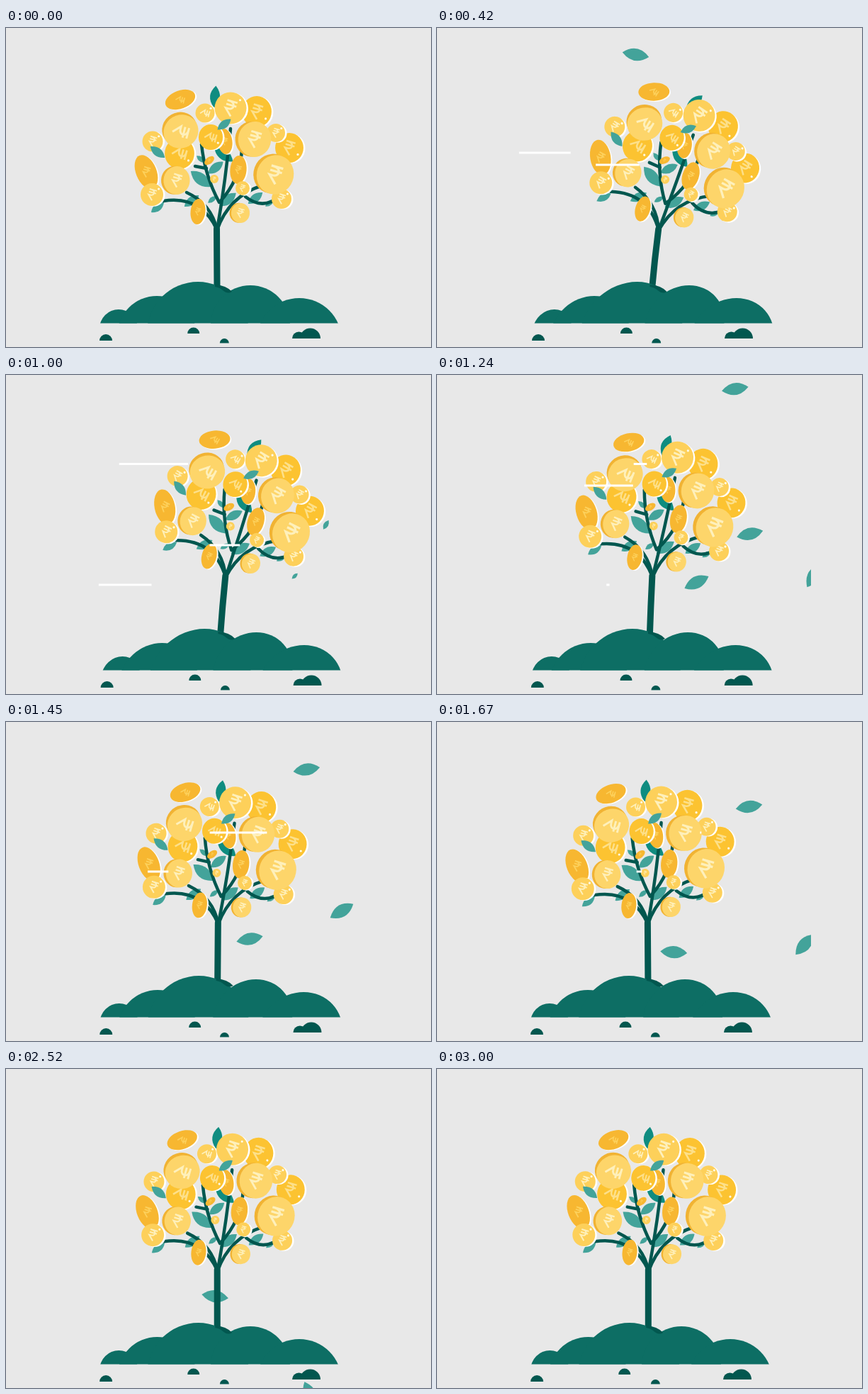
Recreate the animation shown at these times as an HTML page with a canvas. Size 600 px wide and 450 px high, loop 3030 ms.

```html
<!DOCTYPE html>
<html lang="en">
<head>
<meta charset="utf-8">
<title>Money tree</title>
<style>
html, body { margin: 0; width: 100%; height: 100%; overflow: hidden; background: #e8e8e8; }
canvas { display: block; }
</style>
</head>
<body>
<canvas id="stage" width="600" height="450"></canvas>
<script>
const ctx = document.getElementById('stage').getContext('2d');
const LOOP = 3030, STEP = 30, RAD = Math.PI / 180;
const DARK = '#02574f', HILL = '#0d6e64', LEAF = '#43a39a', DEEP = '#0f8c80';
const GROUND = 416.5, FOOT = { x: 298, y: 362 };

// Time keys: [ms, amount]
const SWAY = [[0, 0], [520, 1.1], [640, 1.1], [1670, -.01], [2300, .045], [LOOP, .055]];
const WAVE = [[0, 0], [400, 1], [730, .65], [1180, .85], [2200, 0], [LOOP, 0]];

// Branches: from, to, bow
const BRANCHES = [
  [298, 285, 222, 244, .38], [298, 285, 255, 232, .25], [298, 285, 317, 142, .02],
  [301, 246, 276, 164, -.1], [283, 198, 267, 195, 0], [302, 245, 333, 172, .18],
  [298, 285, 362, 222, -.25], [338, 238, 386, 238, .4]
];

// Leaves: x, y, length; a negative length points up
const LEAVES = [
  [214, 253, -23], [262, 244, -26], [275, 213, 36], [296, 197, -27], [313, 242, -30],
  [291, 242, -15], [352, 240, -26], [372, 247, -15], [275, 185, 15]
];
const FRONT_LEAVES = [[308, 136, -24], [214, 175, 26]];

// Coins by kind: x, y, radius, tilt
const KINDS = [
  { face: '#f7b731', mark: '#fdd15c', squash: .58, edge: 2,
    coins: [[246, 101, 22, 70], [309, 160, 18, -8], [328, 200, 20, 5],
            [287, 187, 8, 52], [271, 259, 18, 6], [198, 203, 25, -22]] },
  { face: '#fcc331', mark: '#fde08a', squash: .95, edge: 2.5, glint: .45,
    coins: [[354, 118, 22], [400, 169, 21], [245, 177, 22], [289, 154, 18]] },
  { face: '#fdd05a', mark: '#fef0bb', squash: 1, edge: 2.5, glint: -.5,
    coins: [[281, 120, 13.5], [317, 113, 22.5], [381, 148, 13], [207, 160, 14.5],
            [206, 235, 16], [389, 241, 14], [334, 226, 10], [294, 213, 6]] },
  { face: '#fdd56a', mark: '#fef0bb', squash: .93, rim: '#f1b333',
    coins: [[247, 146, 25, 60], [351, 157, 25, 5], [241, 215, 20, 3],
            [331, 261, 14, 5], [380, 207, 28, 20]] }
];

const HUMPS = [[159, 424, 27], [213, 434, 56], [271, 430, 72], [345, 419, 56], [414, 441, 60]];

// Gusts: y, left end, start, duration
const GUSTS = [
  [176, 114, 198, 475], [193, 224, 222, 475], [240, 164, 486, 475], [125.5, 130, 668, 475],
  [156, 207, 1017, 475], [296, 114, 755, 370], [211, 200, 1341, 255]
];

// Loose leaves: start, x, y, speed x, speed y (per second), angle, spin
const WIND = 144, FALL = 60;
const LOOSE = [
  [320, 135, 28, 1440, 90, 10, 0], [1100, 425, -7, -51, 197, -9, 0],
  [1000, 421, 184, 57, 161, 6, -84], [960, 414, 283, -215, 19, -46, 72],
  [950, 440, 200, 288, 279, -60, 0], [2300, 302, 176, -63, 644, 8, 0]
];

const smooth = u => (1 - Math.cos(Math.PI * Math.max(0, Math.min(1, u)))) / 2;
const mix = (a, b, u) => a + (b - a) * u;

function at(keys, t) {
  const i = keys.findIndex(k => t < k[0]);
  const [t0, a] = keys[i - 1], [t1, b] = keys[i];
  return mix(a, b, smooth((t - t0) / (t1 - t0)));
}

// Bends the tree about its foot, more strongly with height
function bend(x, y, s) {
  const h = FOOT.y - y, up = Math.max(0, h), off = x - FOOT.x;
  const mean = (4.6 + .026 * up) * s * RAD;
  const turn = (4.6 + .052 * up) * s * RAD;
  return {
    x: FOOT.x + 6 * s + h * Math.sin(mean) + off * Math.cos(turn),
    y: FOOT.y - h * Math.cos(mean) + off * Math.sin(turn),
    turn
  };
}

// Runs paint in a moved and turned frame
function placed(x, y, turn, paint) {
  ctx.save();
  ctx.translate(x, y);
  ctx.rotate(turn);
  paint();
  ctx.restore();
}

function oval(x, y, rx, ry, color) {
  ctx.fillStyle = color;
  ctx.beginPath();
  ctx.ellipse(x, y, rx, ry, 0, 0, 2 * Math.PI);
  ctx.fill();
}

function leaf(length, color = LEAF) {
  const a = length / 2, w = length * .45;
  ctx.fillStyle = color;
  ctx.beginPath();
  ctx.moveTo(-a, 0);
  ctx.quadraticCurveTo(0, -w, a, 0);
  ctx.quadraticCurveTo(0, w, -a, 0);
  ctx.fill();
}

function treeLeaf([x, y, length], s, color) {
  const p = bend(x, y, s);
  const slant = Math.sign(length) * 38 * RAD;
  placed(p.x, p.y, p.turn + slant, () => leaf(Math.abs(length), color));
}

function rupee(size, color) {
  ctx.scale(size, size);
  ctx.strokeStyle = color;
  ctx.lineWidth = .19;
  ctx.beginPath();
  ctx.moveTo(-.5, -.65); ctx.lineTo(.5, -.65);
  ctx.moveTo(-.5, -.28); ctx.lineTo(.5, -.28);
  ctx.moveTo(-.35, -.65);
  ctx.bezierCurveTo(.4, -.65, .4, .1, -.2, .1);
  ctx.lineTo(-.45, .1);
  ctx.lineTo(.22, .75);
  ctx.stroke();
}

function coin(kind, [x, y, r, tilt = 0], s) {
  const p = bend(x, y, s), rx = r * kind.squash;
  placed(p.x, p.y, p.turn, () => {
    if (kind.edge && r > 8) {
      placed(kind.edge, .8, tilt * RAD, () => oval(0, 0, rx, r, '#fff'));
    }
    placed(0, 0, tilt * RAD, () => {
      if (kind.rim) oval(-r * .17, 0, rx, r, kind.rim);
      oval(0, 0, rx, r, kind.face);
    });
    // Coins of the upper left cluster lie on their side
    const lying = Math.hypot(x - 262, y - 140) < 45;
    if (r > 5) {
      placed(0, 0, (lying ? 105 : 16) * RAD, () => rupee(Math.min(rx, r) * .66, kind.mark));
    }
    if (kind.glint && r > 12) oval(rx * .6, r * kind.glint, 1.6, 1.6, '#fffbe6');
  });
}

function branch([x0, y0, x1, y1, bow], s, width = 4.5) {
  const a = bend(x0, y0, s), b = bend(x1, y1, s);
  const c = bend((x0 + x1) / 2 - (y1 - y0) * bow, (y0 + y1) / 2 + (x1 - x0) * bow, s);
  ctx.lineWidth = width;
  ctx.beginPath();
  ctx.moveTo(a.x, a.y);
  ctx.quadraticCurveTo(c.x, c.y, b.x, b.y);
  ctx.stroke();
}

function tree(s) {
  LEAVES.forEach(l => treeLeaf(l, s));
  treeLeaf([307, 178, 34], s, DEEP);
  const top = bend(295, 97, s);
  placed(top.x + 9 * s, top.y + 4 * s, top.turn + (25 * s - 85) * RAD, () => leaf(31, DEEP));

  ctx.strokeStyle = DARK;
  ctx.lineCap = 'round';
  branch([298, 370, 297.5, 283, 0], s, 9);
  BRANCHES.forEach(b => branch(b, s));
  ctx.lineCap = 'butt';

  KINDS.forEach(kind => kind.coins.forEach(c => coin(kind, c, s)));
  FRONT_LEAVES.forEach(l => treeLeaf(l, s));
}

function hill(s, v) {
  ctx.save();
  ctx.beginPath();
  ctx.rect(0, 0, 600, GROUND);
  ctx.clip();
  HUMPS.forEach(([x, y, r], i) => {
    const k = i < 3 ? Math.min(s, 1) : v;
    ctx.save();
    ctx.transform(1, 0, -.12 * k, 1, (4.5 + .12 * GROUND) * k, 0);
    oval(x, y, r, r, HILL);
    ctx.restore();
  });
  ctx.restore();

  // Trunk shadow
  placed(5.5 * mix(s, v, .3), 0, 0, () => {
    ctx.fillStyle = DARK;
    ctx.beginPath();
    ctx.moveTo(295, 362);
    ctx.quadraticCurveTo(311, 363, 319, 372);
    ctx.quadraticCurveTo(313, 376, 306, 370);
    ctx.quadraticCurveTo(302, 366, 295, 365);
    ctx.fill();
  });
}

function rock(x, y, r) {
  ctx.fillStyle = DARK;
  ctx.beginPath();
  ctx.arc(x, y, r, Math.PI, 2 * Math.PI);
  ctx.fill();
}

function rocks(s, v) {
  rock(141 + 2 * s, 441, 9);
  rock(264.7 + 2.7 * v, 431, 8.5);
  rock(308.3 + 1.4 * s, 444.5, 6.5);
  rock(413.5 + 2 * v, 438, 9.5);
  rock(429.5 + 2 * v, 438, 14.5);
}

function looseLeaves(t) {
  ctx.save();
  ctx.beginPath();
  ctx.rect(0, 0, 528, 450);
  ctx.clip();
  for (const [start, x, y, vx, vy, angle, spin] of LOOSE) {
    const u = (t - start) / 1000;
    if (u <= 0) continue;
    placed(x + vx * u + WIND * u * u, y + vy * u + FALL * u * u, (angle + spin * u) * RAD,
      () => leaf(38 * Math.min(1, u * 10)));
  }
  ctx.restore();
}

function gusts(t) {
  ctx.strokeStyle = '#fff';
  ctx.lineWidth = 3;
  for (const [y, left, start, span] of GUSTS) {
    const u = (t - start) / span, length = .35 * span;
    const head = left + length * smooth(u);
    const tail = left + length * smooth(u - .4);
    if (head - tail < .5) continue;
    ctx.beginPath();
    ctx.moveTo(tail, y);
    ctx.lineTo(head, y);
    ctx.stroke();
  }
}

function draw() {
  const t = Math.floor(performance.now() % LOOP / STEP) * STEP;
  const s = at(SWAY, t), v = at(WAVE, t);
  ctx.fillStyle = '#e8e8e8';
  ctx.fillRect(0, 0, 600, 450);
  looseLeaves(t);
  tree(s);
  hill(s, v);
  rocks(s, v);
  gusts(t);
  requestAnimationFrame(draw);
}
draw();
</script>
</body>
</html>
```
